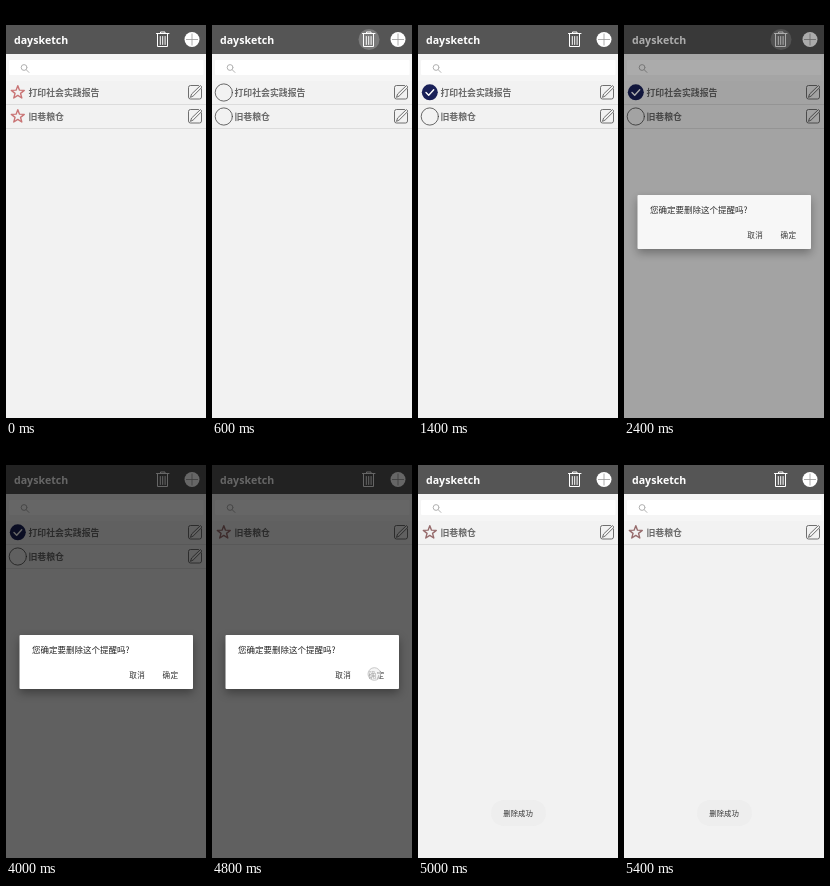
An HTML page for the animation above (5800 ms loop, 200 by 412 pixels).

```html
<!DOCTYPE html>
<html lang="zh-CN">
<head>
<meta charset="utf-8">
<title>Reminder list</title>
<style>
  html, body { margin: 0; width: 100%; height: 100%; overflow: hidden; background: #f2f2f2; }
  svg { display: block; width: 100vw; height: 100vh; }
  text { font-family: "Noto Sans CJK SC", "Noto Sans CJK", sans-serif; }
  .line { fill: none; stroke-linecap: round; stroke-linejoin: round; }
  .title { font: 600 10.6px "Noto Sans", sans-serif; fill: #fff; }
  .item { font-size: 8.9px; font-weight: 700; fill: #6a6a6a; }
  .button { font-size: 7.6px; letter-spacing: .4px; font-weight: 500; fill: #333; }
  #dialog { filter: drop-shadow(0 4px 5px rgba(0, 0, 0, .35)); }
</style>
</head>
<body>
<svg viewBox="0 0 200 412">
  <defs>
    <path id="star" class="line" stroke-width="1.4"/>
    <circle id="ring" class="line" cx="11.8" cy="86.5" r="8.6" stroke="#444" stroke-width=".8"/>
    <g id="edit" class="line" stroke="#606060" stroke-width=".9">
      <path d="M192.5 79.5h-8q-2 0-2 2v9.500q0 2 2 2h9q2 0 2-2v-8"/>
      <path d="M184.600 91l1-3 8.800-8.400 1.600 1.600-8.600 8.600z"/>
    </g>
  </defs>

  <rect width="200" height="412" fill="#f2f2f2"/>
  <rect y="48" width="200" height="27" fill="#f5f5f5"/>
  <rect width="200" height="19"/>
  <rect y="19" width="200" height="29" fill="#555"/>
  <text class="title" x="8" y="37.8">daysketch</text>
  <circle id="ripple" cx="157" cy="33.5" r="10.5" fill="#fff" opacity=".22"/>
  <path class="line" stroke="#fff" d="M150.500 27.500h12.500M154.500 27.500v-1.500h4.500v1.500M151.500 28v12.500h10V28M154.300 30.500v8M156.700 30.500v8M159.100 30.500v8"/>
  <circle cx="186" cy="33.5" r="7.5" fill="#fff"/>
  <path d="M180 33.500h12M186 27.500v12" stroke="#999" stroke-width=".8"/>
  <rect x="3" y="54" width="194.5" height="15" rx="1" fill="#fff"/>
  <path class="line" stroke="#b0b0b0" d="M21 61.500a2.900 2.900 0 1 1-5.800 0a2.900 2.900 0 1 1 5.800 0M20.300 63.800l2.600 2.600"/>

  <g id="first">
    <use class="star" href="#star" stroke="#c97475"/>
    <g id="picked">
      <circle cx="11.8" cy="86.3" r="8" fill="#1a2159"/>
      <path class="line" stroke="#fff" stroke-width="1.4" d="M8 86.500l2.700 2.700 5-5.400"/>
    </g>
    <use id="emptyFirst" href="#ring"/>
    <text class="item" x="22.5" y="89.8">打印社会实践报告</text>
    <use href="#edit"/>
    <path d="M0 98.500h200" stroke="#dcdcdc"/>
  </g>
  <g id="second">
    <use class="star" id="lastStar" href="#star"/>
    <use id="emptySecond" href="#ring"/>
    <text class="item" x="22.5" y="89.8">旧巷粮仓</text>
    <use href="#edit"/>
    <path d="M0 98.500h200" stroke="#dcdcdc"/>
  </g>

  <rect id="scrim" width="200" height="412"/>
  <g id="dialog">
    <rect x="13.5" y="189" width="173.5" height="54" rx="1" fill="#fff"/>
    <text x="26" y="207.3" font-size="8.5" fill="#222">您确定要删除这个提醒吗?</text>
    <text class="button" x="123.3" y="231.6">取消</text>
    <text class="button" x="156.6" y="231.6">确定</text>
    <circle id="touch" cx="162.3" cy="228" r="6.3" fill="#eee" fill-opacity=".6" stroke="#bbb" stroke-width=".8"/>
  </g>
  <g id="toast">
    <rect x="73" y="354" width="55" height="26" rx="13" fill="#eee"/>
    <text x="85.3" y="369.8" font-size="7.4" fill="#333">删除成功</text>
  </g>
</svg>
<script>
const LOOP = 5800;
const get = id => document.getElementById(id);
const show = (id, on) => { get(id).style.display = on ? "" : "none"; };

const starPoints = Array.from({ length: 10 }, (_, i) => {
  const radius = i % 2 ? 2.9 : 6.8;
  const angle = i * Math.PI / 5 - Math.PI / 2;
  return `${11.8 + radius * Math.cos(angle)},${86.5 + radius * Math.sin(angle)}`;
});
get("star").setAttribute("d", `M${starPoints.join("L")}Z`);

function draw(t) {
  const during = (from, to) => t >= from && t < to;
  const selecting = during(600, 4800);
  const deleted = t >= 4800;
  const opening = during(2400, 2600);

  document.querySelectorAll(".star").forEach(star => {
    star.style.display = selecting ? "none" : "";
  });
  show("ripple", during(600, 800) || opening);
  show("picked", during(1200, 4800));
  show("emptyFirst", during(600, 1200));
  show("emptySecond", selecting);
  show("first", !deleted);
  get("second").setAttribute("transform", `translate(0 ${deleted ? 0 : 24})`);
  get("lastStar").setAttribute("stroke", deleted ? "#966b6c" : "#c97475");

  const dialogOpen = during(2400, 5000);
  show("scrim", dialogOpen);
  show("dialog", dialogOpen);
  get("scrim").setAttribute("opacity", opening ? .33 : .6);
  get("dialog").setAttribute("opacity", opening ? .92 : 1);
  show("touch", during(4800, 5000));
  show("toast", t >= 5000);
}

const start = performance.now();
function tick() {
  draw((performance.now() - start) % LOOP);
  requestAnimationFrame(tick);
}
tick();
</script>
</body>
</html>
```
